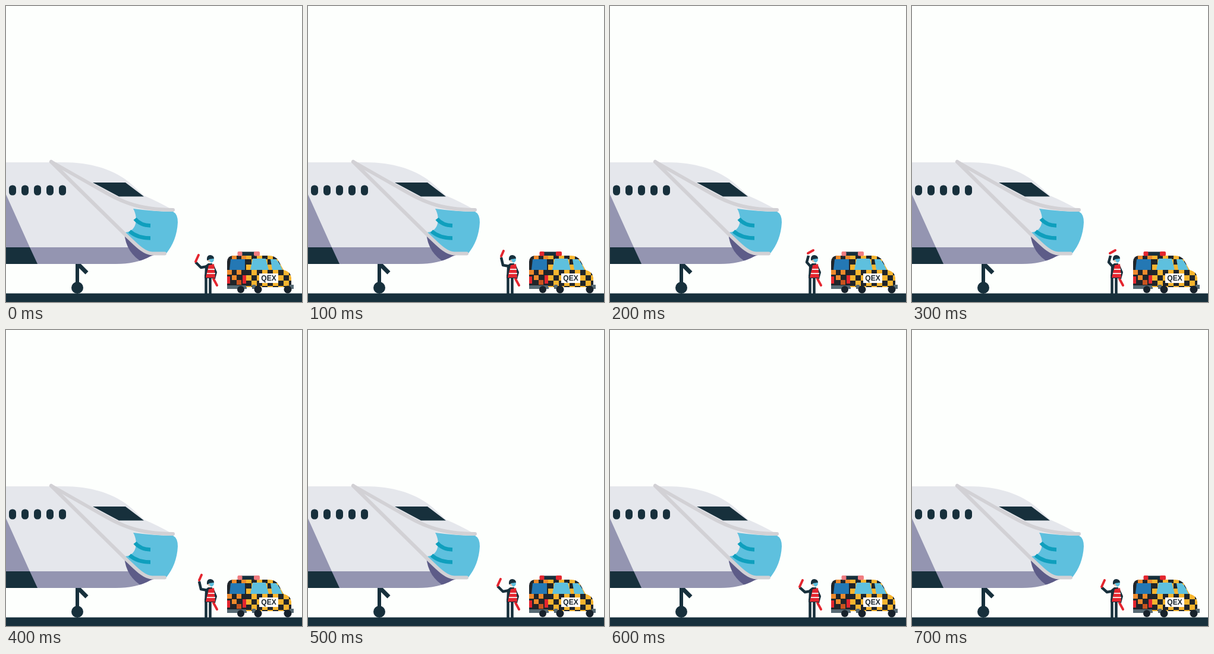
Recreate the animation shown at these times as an HTML page. Size 498x498 px, loop 0.8 s.

```html
<!DOCTYPE html>
<html lang="en">
<head>
<meta charset="utf-8">
<title>Marshaller and masked plane</title>
<style>
html, body { margin: 0; width: 100%; height: 100%; overflow: hidden; background: #fdfffd; }
svg { display: block; width: 100vw; height: 100vh; }
.dark { fill: #17303c; }
.limb { fill: none; stroke: #17303c; stroke-linejoin: round; }
.strap { fill: none; stroke: #d2d1d5; stroke-width: 6; stroke-linecap: round; }
.fold { fill: none; stroke: #0f9fbd; stroke-width: 6.5; }
.glass { fill: #5ec0de; }
.red { fill: #e4262f; }
.orange { fill: #ee8a2c; }
.steel { fill: #566a74; }
.baton { stroke: #e4262f; stroke-width: 4; stroke-linecap: round; }
text { font: bold 12px Arial, "Liberation Sans", sans-serif; text-anchor: middle; fill: #17222b; }
</style>
</head>
<body>
<svg viewBox="0 0 498 498">
  <defs>
    <clipPath id="hull">
      <path d="M0 263H98C140 263 178 274 204 294C213 301 222 310 232 319Q256 329 282 344L268 412L243 421Q220 434 184 434H0Z"/>
    </clipPath>
    <clipPath id="side">
      <path d="M404 420H442Q453 420 458 428L467 444Q479 447 480 457V473H404Z"/>
    </clipPath>
    <clipPath id="rear"><path d="M372 430Q373 420 382 420H405V476H372Z"/></clipPath>
    <pattern id="checks" width="18" height="18" x="404" y="426" patternUnits="userSpaceOnUse">
      <path fill="#f7b52f" d="M0 0H18V18H0Z"/>
      <path fill="#20252a" d="M0 0H9V9H0ZM9 9H18V18H9Z"/>
    </pattern>
  </defs>

  <path class="dark" d="M0 483.5H498V498H0Z"/>

  <!-- landing gear -->
  <path class="limb" stroke-width="6" d="M120 433V472"/>
  <path class="limb" stroke-width="7" d="M120 433L136 449"/>
  <circle class="dark" cx="120" cy="474" r="10"/>

  <!-- fuselage -->
  <g clip-path="url(#hull)">
    <path fill="#e5e7ec" d="M0 255H300V440H0Z"/>
    <path fill="#9495b1" d="M0 317L40 406H250V434H0Z"/>
    <path class="dark" d="M0 406H40L53 434H0Z"/>
    <path fill="#5d5c88" d="M199 382Q202 416 231 432H250V400Z"/>
  </g>
  <g id="windows" class="dark"></g>
  <path class="dark" d="M146 297H201L232 320.5H190Z"/>

  <!-- face mask -->
  <path class="glass" d="M214 341Q250 346 281 346Q289 350 289 364C288 385 281 402 270 416Q242 418 228 408L197 381C219 382 224 359 214 341Z"/>
  <path class="fold" d="M217 358Q226 369 243 369.5M208 379Q221 390.5 243 390.5"/>
  <path class="strap" d="M76 262L150 304C187 325 215 343 281 343"/>
  <path class="strap" d="M76 262L200 384C215 397 230 416 246 416.5H267"/>

  <!-- marshaller -->
  <path class="limb" stroke-width="4.5" d="M336.5 452V484M343.5 452V484"/>
  <path class="limb" stroke-width="4" d="M348 437L353 448L350 459"/>
  <path class="baton" d="M349 459L355 470"/>
  <path class="dark" d="M335 437L340 433H347L350 458H334Z"/>
  <path class="red" d="M341 436L350 434L352 457H336Z"/>
  <path fill="none" stroke="#f6dcdc" stroke-width="2" d="M340 443H351M338 450H352"/>
  <circle fill="#e9c4b2" cx="344" cy="426" r="5.5"/>
  <path class="dark" d="M338 428Q337 419 344 419Q350 420 350 425Z"/>
  <path class="glass" d="M341 426L350 425Q350 431 345 432Z"/>
  <path id="arm" class="limb" stroke-width="4.5"/>
  <path id="baton" class="baton"/>

  <!-- follow-me van -->
  <path class="dark" d="M396 413.5H418V421H396Z"/>
  <g clip-path="url(#rear)">
    <path fill="#20252a" d="M372 420H406V476H372Z"/>
    <path class="orange" d="M380 419H388V426H380ZM396 419H404V426H396ZM372 444H380V452H372ZM388 444H396V452H388ZM380 453H388V461H380Z"/>
    <path fill="#c9541f" d="M388 461H396V469H388Z"/>
    <path fill="#2478b4" d="M378 426H402V444H376Z"/>
    <path class="red" d="M372 455H377V467H372ZM398 453H404V467H398Z"/>
    <path class="steel" d="M372 470H406V476H372Z"/>
  </g>
  <path fill="url(#checks)" clip-path="url(#side)" d="M402 417H482V474H402Z"/>
  <path class="glass" d="M415 425H437L442 444H411ZM445 426H454Q460 431 465 444H448Z"/>
  <path class="steel" d="M414 469H420V476H414ZM477 469H484V476H477Z"/>
  <g fill="#17222b">
    <circle cx="395" cy="477" r="6"/>
    <circle cx="424" cy="477" r="6.5"/>
    <circle cx="474" cy="477" r="6.5"/>
  </g>
  <path fill="#fff" d="M426 450H458V466H426Z"/>
  <text x="442" y="462">QEX</text>
  <g id="beacons">
    <rect x="389.5" y="413" width="8" height="7.5" rx="2"/>
    <rect x="417" y="413" width="10" height="7.5" rx="2"/>
  </g>
</svg>
<script>
const $ = id => document.getElementById(id);

$("windows").innerHTML = [0, 1, 2, 3, 4].map(i =>
  `<rect x="${5 + 21 * i}" y="301.5" width="12" height="17" rx="5.5"/>`).join("");

const low = { arm: "M339 439L328 441L319 433", baton: "M319 432L324 421" };
const rest = { arm: "M339 438L328 440L319 431", baton: "M319 430L324 419" };
const mid = { arm: "M339 438L328 436L325 423", baton: "M325 421L329 412" };
const high = { arm: "M339 440L331 431L334 420", baton: "M333 416L342 411" };
const wave = [rest, mid, high, high, mid, rest, low, low];

function draw(now) {
  const step = Math.floor(now / 100) % wave.length;
  $("arm").setAttribute("d", wave[step].arm);
  $("baton").setAttribute("d", wave[step].baton);
  $("beacons").setAttribute("fill", step % 2 ? "#e3272f" : "#f07c80");
  requestAnimationFrame(draw);
}
draw(performance.now());
</script>
</body>
</html>
```
